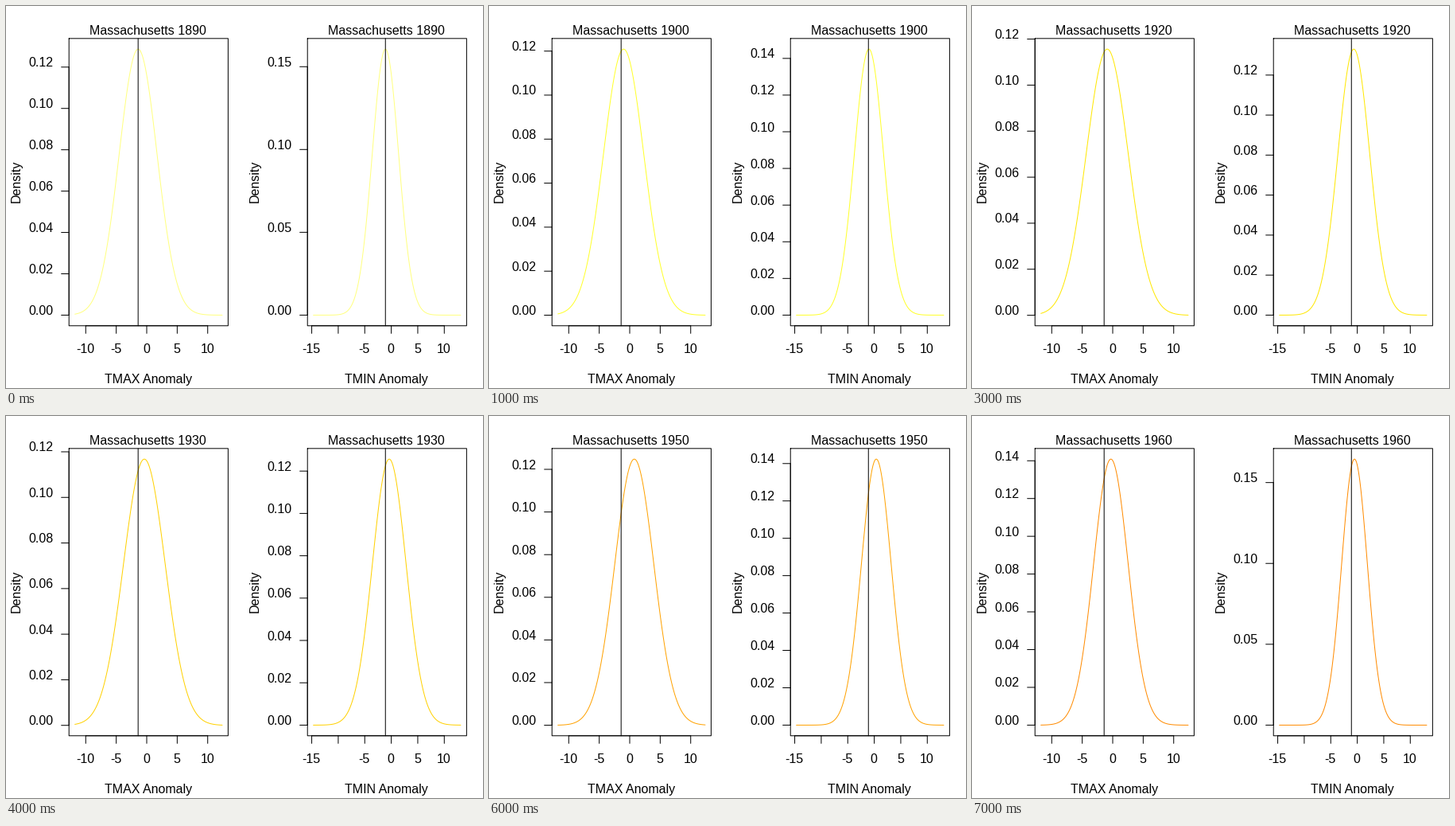
Recreate the animation shown at these times as a matplotlib script. Size 600 by 480 pixels, loop 8 s.

```python
import numpy as np
import matplotlib.pyplot as plt
from matplotlib.animation import FuncAnimation

plt.rcParams["font.family"] = "Liberation Sans"
plt.rcParams["path.simplify"] = False

W, H, DPI = 600, 480, 100
PT = 72 / DPI            # points per pixel
LINE = 19.2              # height of one margin line
TOP, BOTTOM = 40.32, 401.28
BOX_W = 200.16
PAD = 0.04 / 1.08        # share of the box left empty on each side

COLORS = ["#FFFF80", "#FFFF2A"] + [
    (1, 1 - k / 11, 0) for k in range(6)]

# One (mean, sd) pair per decade.
PANELS = [
    dict(left=78.72, name="TMAX", lo=-11.78, hi=12.38, ref=-1.41,
         ticks=[-10, -5, 0, 5, 10], hidden=[],
         stats=[(-1.41, 3.10), (-1.0, 3.30), (-1.70, 3.667), (-0.9, 3.45),
                (-0.39, 3.416), (0.28, 3.661), (0.75, 3.197), (-0.30, 2.832)]),
    dict(left=378.72, name="TMIN", lo=-14.69, hi=13.10, ref=-1.10,
         ticks=[-15, -10, -5, 0, 5, 10], hidden=[-10],
         stats=[(-1.10, 2.484), (-1.0, 2.75), (-0.93, 3.02), (-0.65, 3.0),
                (-0.38, 3.175), (0.11, 2.778), (0.38, 2.802), (-0.52, 2.425)]),
]

fig = plt.figure(figsize=(W / DPI, H / DPI), dpi=DPI, facecolor="white")
ax = fig.add_axes([0, 0, 1, 1])


def line(xs, ys, color="black"):
    ax.plot(np.asarray(xs) + 0.5, np.asarray(ys) + 0.5, color=color,
            lw=PT, snap=False, solid_capstyle="round",
            solid_joinstyle="round")


def label(x, y, text, ha="center", rotation=0):
    ax.text(x, y, text, fontsize=16 * PT, ha=ha, va="baseline",
            rotation=rotation, rotation_mode="anchor")


def draw_panel(panel, i):
    left, lo, hi = panel["left"], panel["lo"], panel["hi"]
    right, mid = left + BOX_W, left + BOX_W / 2
    mean, sd = panel["stats"][i]

    x = np.linspace(lo, hi, 400)
    density = np.exp(-((x - mean) / sd) ** 2 / 2) / (sd * np.sqrt(2 * np.pi))
    d_min, d_max = density.min(), density.max()

    def to_x(v):
        return left + BOX_W * (PAD + (1 - 2 * PAD) * (v - lo) / (hi - lo))

    def to_y(v):
        share = (v - d_min) / (d_max - d_min)
        return BOTTOM - (BOTTOM - TOP) * (PAD + (1 - 2 * PAD) * share)

    line(to_x(x), to_y(density), COLORS[i])

    # Horizontal axis
    ticks = panel["ticks"]
    line([to_x(ticks[0]), to_x(ticks[-1])], [BOTTOM, BOTTOM])
    for v in ticks:
        line([to_x(v)] * 2, [BOTTOM, BOTTOM + LINE / 2])
        if v not in panel["hidden"]:
            label(to_x(v), BOTTOM + 1.8 * LINE, str(v))

    # Vertical axis
    step = 0.05 if d_max > 0.15 else 0.02
    ticks = [k * step for k in range(10) if to_y(k * step) >= TOP]
    line([left, left], [to_y(ticks[0]), to_y(ticks[-1])])
    for v in ticks:
        line([left - LINE / 2, left], [to_y(v)] * 2)
        label(left - LINE, to_y(v), f"{v:.2f}", ha="right")

    line([left, right, right, left, left], [TOP, TOP, BOTTOM, BOTTOM, TOP])
    line([to_x(panel["ref"])] * 2, [TOP, BOTTOM])

    label(mid, TOP - 0.2 * LINE, f"Massachusetts {1890 + 10 * i}")
    label(mid, BOTTOM + 3.8 * LINE, panel["name"] + " Anomaly")
    label(left - 3.2 * LINE, (TOP + BOTTOM) / 2, "Density", rotation=90)


def draw(i):
    ax.clear()
    ax.set_xlim(0, W)
    ax.set_ylim(H, 0)
    ax.axis("off")
    for panel in PANELS:
        draw_panel(panel, i)
    return []


anim = FuncAnimation(fig, draw, frames=8, interval=1000, repeat=True,
                     repeat_delay=0)
plt.show()
```
